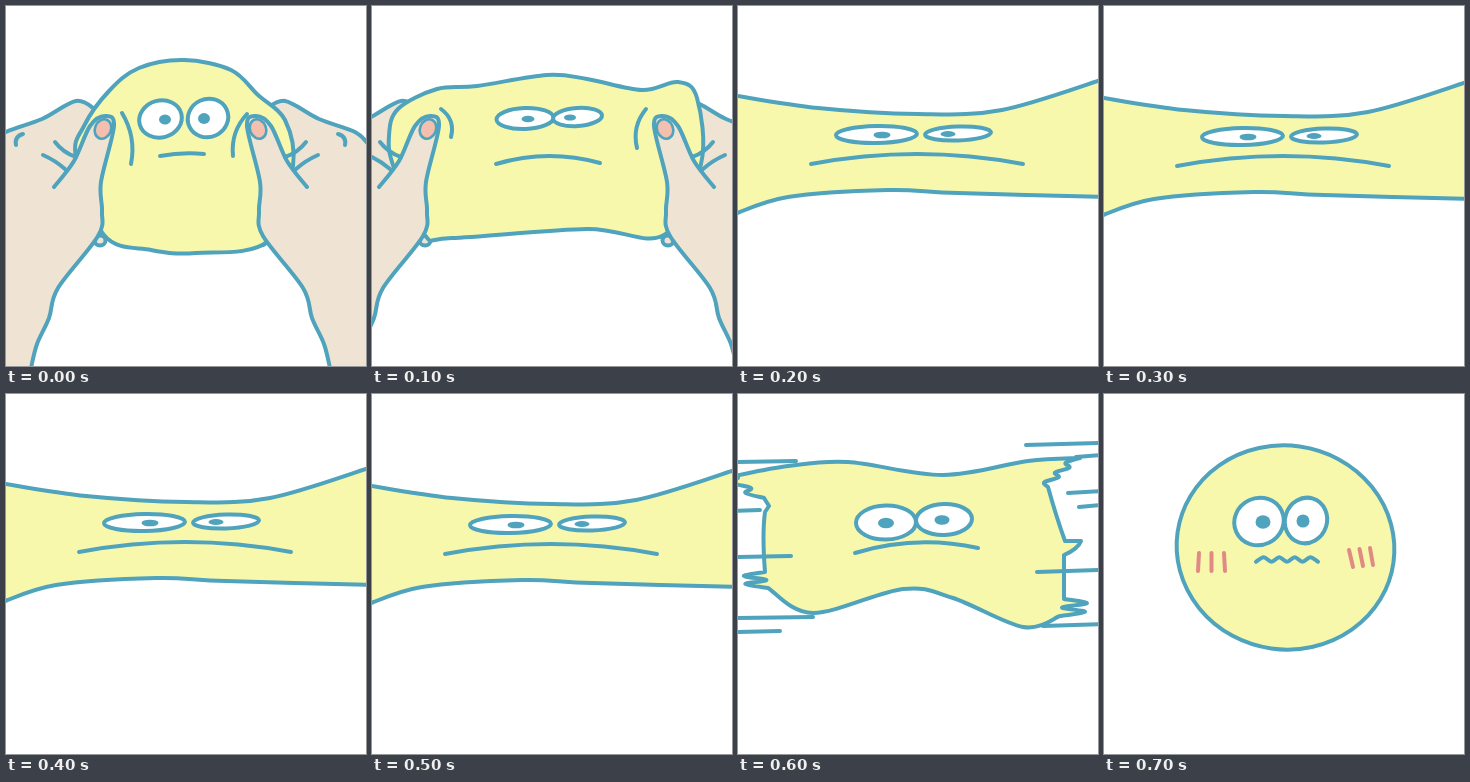
An HTML page that plays this animation: 360 by 360 pixels, repeating every 1.2 s.

```html
<!DOCTYPE html>
<html lang="en">
<head>
<meta charset="utf-8">
<title>Squishy</title>
<style>
  html, body { margin: 0; width: 100%; height: 100%; overflow: hidden; background: #fff; }
  svg { display: block; width: 100vw; height: 100vh; }
  path, ellipse { stroke: #4fa3bd; stroke-width: 4; stroke-linecap: round; stroke-linejoin: round; fill: none; }
  .body { fill: #f8f8ac; }
  .skin { fill: #efe4d3; }
  .nail { fill: #f3bfae; stroke-width: 2.6; }
  .white { fill: #fff; }
  .pupil { fill: #4fa3bd; stroke: none; }
  .blush { stroke: #e08a86; }
  .pose { visibility: hidden; }
</style>
</head>
<body>
<svg id="stage" viewBox="0 0 360 360"></svg>
<script>
const LOOP = 1200, STEP = 100;
const order = ["hold", "pull", "taut", "shake", "taut", "shake", "snap", "rest"];

// Smooth path through "x,y x,y ..." points (Catmull-Rom)
function curve(text, closed = false) {
  const p = text.trim().split(/\s+/).map(s => s.split(",").map(Number));
  const n = p.length;
  const at = i => closed ? p[(i + n) % n] : p[Math.max(0, Math.min(n - 1, i))];
  let d = `M${p[0]}`;
  for (let i = 0; i < (closed ? n : n - 1); i++) {
    const [a, b, c, e] = [at(i - 1), at(i), at(i + 1), at(i + 2)];
    const c1 = [0, 1].map(k => b[k] + (c[k] - a[k]) / 6);
    const c2 = [0, 1].map(k => c[k] - (e[k] - b[k]) / 6);
    d += `C${c1} ${c2} ${c}`;
  }
  return closed ? d + "Z" : d;
}

const path = (d, cls = "") => `<path class="${cls}" d="${d}"/>`;
const oval = (x, y, rx, ry, turn, cls) =>
  `<ellipse class="${cls}" cx="${x}" cy="${y}" rx="${rx}" ry="${ry}" transform="rotate(${turn} ${x} ${y})"/>`;
const eye = (x, y, rx, ry, turn, look, size) =>
  oval(x, y, rx, ry, turn, "white") + oval(x + look, y + 0.5, size, size * (0.25 + 0.7 * ry / rx), 0, "pupil");

// Stroke bowed sideways by `bend` pixels
function bow(x1, y1, x2, y2, bend = 0, cls = "") {
  const dx = x2 - x1, dy = y2 - y1, k = 2 * bend / Math.hypot(dx, dy);
  return path(`M${x1} ${y1}Q${(x1 + x2) / 2 + dy * k} ${(y1 + y2) / 2 - dx * k} ${x2} ${y2}`, cls);
}

// Ragged edge: every other point is pushed sideways
function fray(x1, y1, x2, y2, teeth, push) {
  const points = Array.from({ length: 2 * teeth + 1 }, (_, i) => {
    const u = i / (2 * teeth);
    return `${x1 + (x2 - x1) * u + (i % 2) * push},${y1 + (y2 - y1) * u}`;
  });
  return curve(points.join(" ")).replace("M", "L");
}

// Left hand, split so the body sits between fingers and thumb
const fingers = path(curve("90,104 70,95 36,113 0,126 -14,139") + "L-22 190H50", "skin") +
  oval(94, 234.5, 5.5, 5, 0, "skin");
const thumb = path(
  curve("48,181 68,155 84,120 99,110 108,120 95,176 96,205 92,230 52,282 43,312 31,338 25,362") +
  "L-70 368V178", "skin") +
  oval(97, 123, 8, 10, 22, "nail") +
  bow(49, 136, 70, 151, -2) + bow(37, 149, 59, 163, 1) + bow(10, 139, 17, 128, 3);

const hands = (part, spread) =>
  `<g transform="translate(${-spread})">${part}</g>` +
  `<g transform="translate(${349 + spread}) scale(-1 1)">${part}</g>`;
const held = (outline, spread) =>
  hands(fingers, spread) + path(curve(outline, true), "body") + hands(thumb, spread);

const taut = path(
  curve("-6,89 80,102 180,108 264,104 366,73") + "L370 192" +
  curve("366,191 220,187 150,184 50,191 -6,209").replace("M", "L"), "body") +
  eye(138.5, 128.5, 40.5, 8.5, -1, 5.5, 8.5) +
  eye(220, 127.5, 33, 7, -2, -10, 7.5) +
  bow(73, 158, 285, 158, 10);

const torn = path(
  curve("-4,82 50,72 110,68 205,81 290,67 342,64") +
  fray(342, 64, 310, 93, 3, -9) +
  "Q318 122 327 147L343 147Q340 155 326 161V205" +
  fray(326, 205, 322, 222, 2, 24) +
  curve("322,222 285,233 215,204 165,195 75,219 30,194").replace("M", "L") +
  fray(30, 194, 27, 178, 2, -22) +
  "Q24 140 27 118L31 112" +
  fray(26, 104, 0, 84, 2, -12), "body");

const windLeft = { 68: 58, 117: 22, 163: 53, 224: 75, 238: 42 };
const windRight = { 51: 288, 63: 338, 99: 330, 113: 341, 178: 299, 232: 305 };
const wind =
  Object.entries(windLeft).map(([y, x]) => bow(-4, +y, x, y - 1)).join("") +
  Object.entries(windRight).map(([y, x]) => bow(x, +y, 364, y - 2)).join("");

const wave = Array.from({ length: 9 }, (_, i) =>
  `${152 + 7.75 * i},${165.5 + 2.3 * Math.cos(Math.PI * i)}`).join(" ");
const blush = [0, 1, 2].map(i =>
  bow(95 + 12.5 * i, 159, 94 + 13.5 * i, 177, 0, "blush") +
  bow(245 + 10.5 * i, 156 - i, 249 + 10 * i, 173 - i, 0, "blush")).join("");

const poses = {
  hold: held("70,152 78,120 103,85 133,62 178,54 225,64 252,89 279,114 287,160 " +
      "262,235 190,247 145,244 98,229", 0) +
    bow(116, 107, 125, 158, 5) + bow(241, 108, 227, 150, -5) +
    eye(154.5, 113, 21.5, 18.5, -15, 4.5, 6) +
    eye(202, 112, 20.5, 19, -25, -4, 6) +
    bow(154, 150, 198, 148, 1.5),

  pull: held("22,162 17,130 26,103 65,83 105,80 175,69 215,73 270,84 306,76 325,92 " +
      "329,158 292,229 215,223 80,232 52,228", 41) +
    bow(69, 103, 79, 131, 5) + bow(274, 103, 265, 142, -5) +
    eye(153, 112.5, 28.5, 10.5, -2, 3, 6.5) +
    eye(205.5, 111, 24.5, 9, -4, -7.5, 6) +
    bow(124, 158, 228, 157, 7.5),

  taut,
  shake: `<g transform="translate(0 2)">${taut}</g>`,

  snap: torn + wind +
    eye(148, 128.5, 30, 17, -1, 0, 8) +
    eye(206, 125.5, 28, 15.5, -2, -2, 7.5) +
    bow(117, 159, 240, 154, 8),

  rest: oval(181.5, 153.5, 109, 102, 8, "body") +
    eye(155, 127.5, 25, 23.5, -25, 4, 7.5) +
    eye(202, 126.5, 21, 23, 18, -3, 6.5) +
    path(curve(wave)) + blush
};

const stage = document.getElementById("stage");
stage.innerHTML = Object.entries(poses)
  .map(([name, art]) => `<g class="pose" id="${name}">${art}</g>`).join("");

const start = performance.now();
function draw(now) {
  const t = Math.max(0, now - start) % LOOP;
  const current = order[Math.min(order.length - 1, Math.floor(t / STEP))];
  for (const pose of stage.children)
    pose.style.visibility = pose.id === current ? "visible" : "hidden";
  requestAnimationFrame(draw);
}
draw(start);
</script>
</body>
</html>
```
